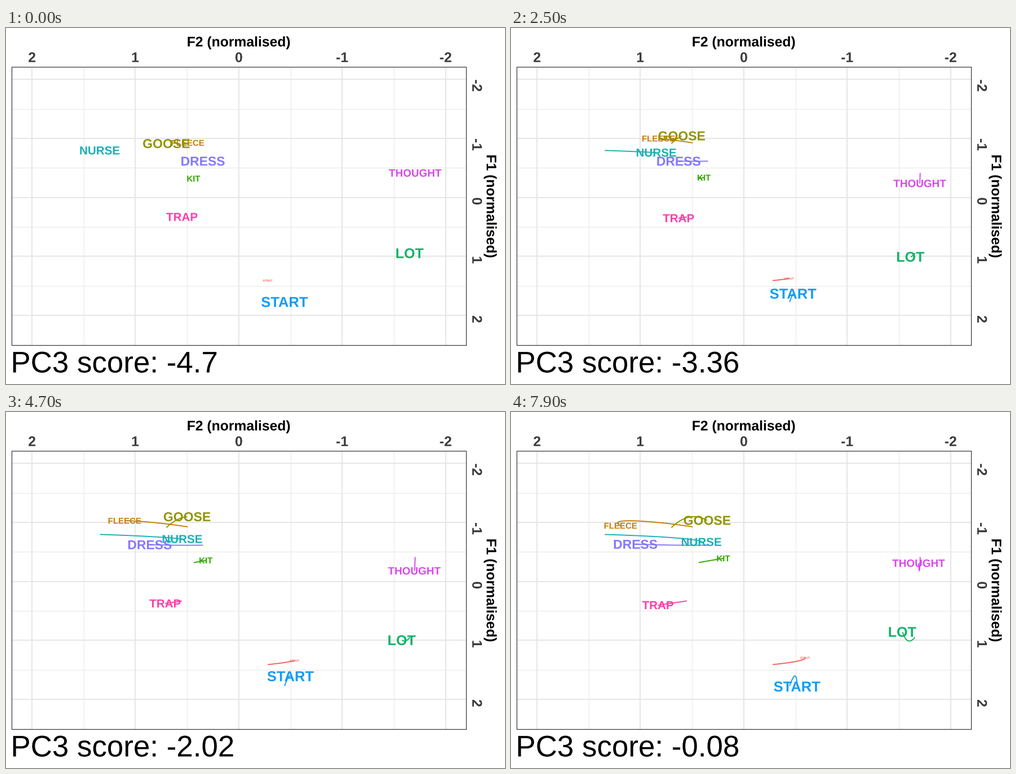
Write a matplotlib script that moves like this. It is 885 px wide and 632 px high and loops after 8000 ms.

```python
import numpy as np
import matplotlib.pyplot as plt
from matplotlib.animation import FuncAnimation
from matplotlib.patches import PathPatch, Rectangle
from matplotlib.textpath import TextPath
from matplotlib.transforms import Affine2D

W, H, DPI = 885, 632, 100
PT = 72 / DPI                      # points per pixel
CAP = 0.344                        # half the cap height, in ems
LEFT, TOP, RIGHT, BOTTOM = 10, 69, 816, 563
STEPS = 38

# word, colour, size, then points passed at even time spacing
WORDS = [
    ("DRESS", "#8378ff", 22.9, (349, 236), (290, 236), (244.5, 235), (220.5, 234.5)),
    ("FLEECE", "#c87c0a", 15, (322, 203.5), (252.5, 195), (199.5, 193), (194, 201.5)),
    ("GOOSE", "#919400", 23, (284, 204.8), (315.7, 186.3), (347.5, 192)),
    ("KIT", "#2fa900", 15, (332.5, 267), (350.7, 263.7), (376.5, 259.5)),
    ("LOT", "#13b26a", 25.1, (716, 399.5), (703.7, 405.8), (694, 390)),
    ("NURSE", "#17b1b6", 20.6, (166, 217), (268, 221.5), (322.5, 226.3), (337.5, 230.3)),
    ("START", "#129df3", 25.5, (493.7, 486), (503.3, 468.2), (507, 487)),
    ("STRUT", "#f65f57", 5.1, (463.8, 448), (507.3, 442), (521, 436)),
    ("THOUGHT", "#db47ee", 18.9, (725.3, 257), (724, 281.2), (722.5, 268)),
    ("TRAP", "#fb40a9", 20.6, (311.5, 335), (285.7, 338.9), (260, 342.5)),
]

fig = plt.figure(figsize=(W / DPI, H / DPI), dpi=DPI, facecolor="white")
ax = fig.add_axes([0, 0, 1, 1])
ax.set_xlim(0, W)
ax.set_ylim(H, 0)
ax.axis("off")


def glyphs(text, size, bold=True, anchor="center"):
    """Outline of text on its baseline, y pointing down."""
    font = {"family": "Liberation Sans", "weight": "bold" if bold else "normal"}
    path = TextPath((0, 0), text, size=size, prop=font)
    box = path.get_extents()
    dx = {"center": -(box.x0 + box.x1) / 2, "ink": -box.x0, "left": 0}[anchor]
    return path.transformed(Affine2D().translate(dx, 0).scale(1, -1))


def put(path, x, y, color, turn=0, z=5):
    place = Affine2D().rotate_deg(turn).translate(x, y)
    patch = PathPatch(path.transformed(place), fc=color, lw=0, zorder=z)
    return ax.add_patch(patch)


def grid(x0, y0, x1, y1, major):
    color, width = ("#e5e5e5", 1.9) if major else ("#e9e9e9", 1.1)
    ax.plot([x0, x1], [y0, y1], color=color, lw=width * PT,
            solid_capstyle="butt", zorder=2 if major else 1)


def to_x(v):
    return 412.9 - 183.4 * v


def to_y(v):
    return 300.7 + 104.7 * v


def through(points):
    """Smooth curve through points, as a function of time 0..1."""
    n = len(points)
    fits = [np.poly1d(np.polyfit(np.linspace(0, 1, n), axis, n - 1))
            for axis in zip(*points)]
    return lambda t: [fit(t) + 0.4 for fit in fits]


for half in range(-4, 5):
    major = half % 2 == 0
    v = half / 2
    grid(to_x(v), TOP, to_x(v), BOTTOM, major)
    grid(LEFT, to_y(v), RIGHT, to_y(v), major)
    if major:
        name = str(half // 2)
        put(glyphs(name, 24.8), to_x(v), 60.5, "#3b3b3b")
        put(glyphs(name, 24.8, anchor="ink"), 827, to_y(v) + 0.9, "#3b3b3b", 90)

ax.add_patch(Rectangle((LEFT + 0.3, TOP + 0.3), RIGHT - LEFT, BOTTOM - TOP,
                       fill=False, ec="#333333", lw=1.2 * PT, zorder=8))
put(glyphs("F2 (normalised)", 24.7), 412.9, 32.7, "black")
put(glyphs("F1 (normalised)", 24.7), 852.5, 316.7, "black", 90)

score = put(glyphs("PC3", 53, False, "left"), 0, 0, "black")
tracks = []
for z, (word, color, size, *points) in enumerate(WORDS):
    line, = ax.plot([], [], color=color, lw=1.9 * PT, solid_capstyle="butt",
                    solid_joinstyle="round", zorder=10 + z)
    shape = glyphs(word, size)
    label = put(shape, 0, 0, color, z=30 + z)
    tracks.append((through(points), line, label, shape, CAP * size))


def draw(i):
    step = 0 if i < 5 else (i - 5) // 2 + 1
    now = step / STEPS
    t = np.linspace(0, now, 4 * step + 1)
    for curve, line, label, shape, drop in tracks:
        line.set_data(*curve(t))
        x, y = curve(now)
        label.set_path(shape.transformed(Affine2D().translate(x, y + drop)))
    value = round(-4.6995 + 0.12167 * step, 2)
    text = glyphs(f"PC3 score: {value:g}", 52.9, False, "left")
    score.set_path(text.transformed(Affine2D().translate(8.4, 611.5)))
    return []


anim = FuncAnimation(fig, draw, frames=80, interval=100, repeat=True,
                     repeat_delay=0, init_func=lambda: draw(0))
plt.show()
```
